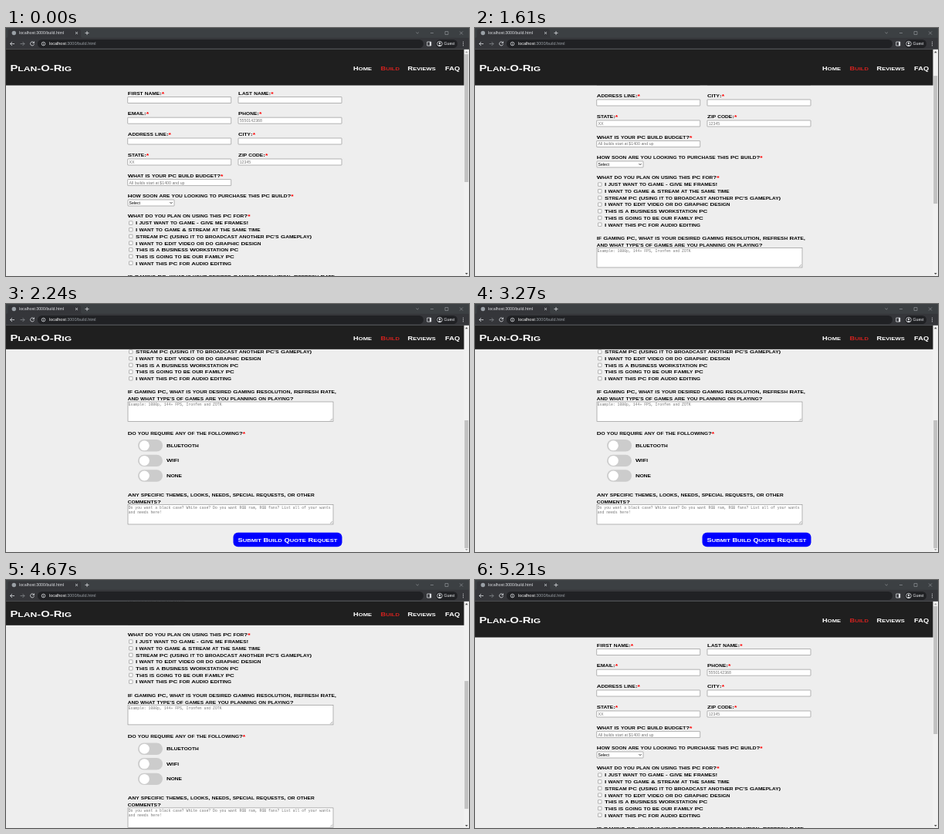
An HTML page that plays this animation: 600 px wide and 322 px high, repeating every 6480 ms.

```html
<!DOCTYPE html>
<html lang="en">
<head>
<meta charset="utf-8">
<title>Quote form</title>
<style>
  html, body { margin: 0; height: 100%; overflow: hidden; background: #eee; }
  svg { display: block; width: 600px; height: 322px; font-family: "Liberation Sans", Arial, sans-serif; }
  .wide { font-weight: bold; }
  .low { font-size: .82em; text-transform: uppercase; }
  .star { fill: #f00; font-size: 1.1em; }
  .hint { font-size: 5.25px; fill: #757575; }
  .mono { font: 4.8px "Liberation Mono", monospace; fill: #757575; }
  .field { fill: #fff; stroke: #858585; stroke-width: .6; }
  .line { fill: none; stroke: #dadce0; stroke-width: .8; }
  .dim { stroke: #85888c; }
</style>
</head>
<body>
<svg viewBox="0 0 600 322">
  <rect width="600" height="322" fill="#eee"/>
  <g id="form"></g>
  <rect id="bar" y="27.500" width="594" height="47"  fill="#1f1f1f"/>
  <g id="nav"></g>
  <g id="scrollbar">
    <rect x="593.5" y="27.500" width="6.5" height="294.500" fill="#f1f1f1"/>
    <path id="up" d="M595 32.2h3.6l-1.8-2.2z" fill="#505050"/>
    <path id="down" d="M595 318h3.6l-1.8 2.2z" fill="#505050"/>
    <rect id="thumb" x="594.2" y="34" width="5" height="166" fill="#c1c1c1"/>
  </g>
  <g id="browser">
    <rect width="600" height="27.500" fill="#3c4043"/>
    <path d="M0 12.800q2.5 0 2.5-2.5V4Q2.5 1.500 5 1.500H94Q97 1.500 97 4V10.300Q97 12.800 99 12.800H600V27.500H0z" fill="#35363a"/>
    <circle cx="10.300" cy="6.500" r="2.700" fill="#9aa0a6"/>
    <text x="17" y="8.400" font-size="5.270" fill="#dfe1e5">localhost:3000/build.html</text>
    <path class="line" d="M90 5l3 3m0-3l-3 3M102.500 6.500h5m-2.500-2.500v5"/>
    <path class="line dim" d="M531.500 5.500l1.700 1.700 1.700-1.700M550 6.500h4M569 4.500h4v4h-4zM588 4.500l4 4m0-4l-4 4"/>
    <rect x="41" y="15" width="500" height="11" rx="5.500" fill="#202124"/>
    <path class="line" d="M11 20.500H5.500m2.500-2.500l-2.500 2.500 2.500 2.500M36 18.800a2.500 2.500 0 1 0 .5 2M36.500 17.500v2h-2"/>
    <path class="line dim" d="M18.500 20.500H24m-2.500-2.500l2.500 2.500-2.500 2.500"/>
    <circle class="line" cx="48.500" cy="20.500" r="2.300"/>
    <path class="line" d="M48.500 20.200v1.600M48.500 18.900v.6M545.800 18h5v5h-5z"/>
    <rect x="549" y="18" width="2" height="5" fill="#dadce0"/>
    <text x="56" y="22.400" font-size="5.500" fill="#9aa0a6"><tspan fill="#fff">localhost</tspan>:3000/build.html</text>
    <rect x="557" y="15" width="28" height="11" rx="5.500" fill="#202124"/>
    <circle class="line" cx="562" cy="20.500" r="3.300"/>
    <path d="M560 22.800q2-2.200 4 0l-2 .9z" fill="#dadce0"/>
    <circle cx="562" cy="19.700" r="1.200" fill="#dadce0"/>
    <text x="567.500" y="22.300" font-size="5.200" fill="#e8eaed">Guest</text>
    <path d="M592 17.800h1v1h-1zm0 2.200h1v1h-1zm0 2.200h1v1h-1z" fill="#dadce0"/>
  </g>
</svg>
<script>
const $ = id => document.getElementById(id);
const LOOP = 6480, MAX = 208.5, WIDEN = 1.4;

// Extended small-caps lettering, centred on y
const wide = (x, y, text, { size = 8, fill = '#000', star = false } = {}) =>
  `<text class="wide" transform="translate(${x} ${y + size * .26}) scale(${WIDEN} 1)" font-size="${size / WIDEN}" fill="${fill}">` +
  text.replace(/[a-z']+/g, w => `<tspan class="low">${w}</tspan>`) +
  (star ? '<tspan class="star" dy="1">*</tspan>' : '') + '</text>';

const label = (x, y, text) => wide(x, y, text, { star: true });
const plain = (x, y, text, kind) => `<text class="${kind}" x="${x}" y="${y}">${text}</text>`;
const box = (x, y, w, h, rx = .4) => `<rect class="field" x="${x}" y="${y}" width="${w}" height="${h}" rx="${rx}"/>`;

const input = (x, y, name, hint = '') =>
  label(x, y, name) + box(x, y + 5, 134, 8) + plain(x + 1.7, y + 10.9, hint, 'hint');

const area = (y, ...lines) => box(158, y, 266, 25.5, 0) +
  lines.map((s, i) => plain(158.7, y + 5.3 + i * 5.7, s, 'mono')).join('') +
  `<path d="M420 ${y + 24.5}l3-3m-1.400 3l1.400-1.400" stroke="#777" stroke-width=".5"/>`;

const check = (text, i) => {
  const y = 253.4 + i * 8.68;
  return box(159.5, y - 2.5, 4.5, 4.5) + wide(168, y, text);
};

const toggle = (text, i) => {
  const y = 392.3 + i * 19.6;
  return `<rect x="171" y="${y - 7.7}" width="32" height="15.400" rx="7.700" fill="#ccc"/>` +
    `<circle cx="179.300" cy="${y}" r="6.500" fill="#fff"/>` + wide(208, y, text);
};

const L = 157.7, R = 301;
$('form').innerHTML = [
  input(L, 84.5, 'First name:'), input(R, 84.5, 'Last name:'),
  input(L, 111.2, 'Email:'), input(R, 111.2, 'Phone:', '5550142368'),
  input(L, 138, 'Address line:'), input(R, 138, 'City:'),
  input(L, 165, 'State:', 'XX'), input(R, 165, 'Zip code:', '12345'),
  input(L, 191.6, 'What is your PC build budget?', 'All builds start at $1400 and up'),
  label(L, 218, 'How soon are you looking to purchase this PC build?'),
  box(158, 223, 60, 8), '<text x="159.500" y="228.900" font-size="5.200">Select</text>',
  '<path d="M212.500 226.200l1.500 1.500 1.500-1.500" fill="none" stroke="#000" stroke-width=".8"/>',
  label(L, 244.2, 'What do you plan on using this PC for?'),
  ...['I just want to Game - Give me Frames!', 'I want to Game & Stream at the same time',
    "Stream PC (Using it to broadcast another PC's Gameplay)", 'I want to Edit Video or do Graphic Design',
    'This is a Business Workstation PC', 'This is going to be our Family PC',
    'I want this PC for Audio Editing'].map(check),
  wide(L, 322.7, 'If Gaming PC, what is your desired Gaming Resolution, Refresh Rate,'),
  wide(L, 331.6, "and what type's of games are you planning on playing?"),
  area(335.5, 'Example: 1080p, 144+ FPS, Ironfen and ZOTK'),
  label(L, 376.5, 'Do you require any of the following?'),
  ...['Bluetooth', 'WiFi', 'None'].map(toggle),
  wide(L, 456.3, 'Any specific themes, looks, needs, special requests, or other'),
  wide(L, 465, 'comments?'),
  area(469, 'Do you want a black case? White case? Do you want RGB ram, RGB fans? List all of your wants', 'and needs here!'),
  '<rect x="294.500" y="505.300" width="141" height="18.400" rx="6" fill="#00f"/>',
  wide(300.5, 514.8, 'Submit Build Quote Request', { size: 9.3, fill: '#fff' })
].join('');

$('nav').innerHTML = wide(5.5, 52, 'Plan-O-Rig', { size: 14.8, fill: '#fff' }) +
  [[450, 'Home'], [485.5, 'Build'], [520.5, 'Reviews'], [569, 'FAQ']].map(([x, text]) =>
    wide(x, 52.2, text, { size: 9.3, fill: text === 'Build' ? '#d3221f' : '#fff' })).join('');

// Scroll stops: [time, offset]
const stops = [[0, 0], [1410, 0], [1420, 3.5], [1910, 141.5], [2060, MAX], [4500, MAX], [5153, 0], [LOOP, 0]];

function scrollAt(t) {
  const i = stops.findIndex(s => s[0] > t);
  const [t0, a] = stops[i - 1], [t1, b] = stops[i];
  const p = (t - t0) / (t1 - t0);
  return a + (b - a) * p * p * (3 - 2 * p);
}

function draw() {
  const y = scrollAt(performance.now() % LOOP);
  const small = y > 80;
  $('form').setAttribute('transform', `translate(0 ${-y})`);
  $('bar').setAttribute('height', small ? 31.3 : 47);
  $('nav').setAttribute('transform', `translate(0 ${small ? -7.7 : 0})`);
  $('thumb').setAttribute('y', 34 + y / MAX * 117);
  $('up').setAttribute('fill', y < 1 ? '#a3a3a3' : '#505050');
  $('down').setAttribute('fill', y > MAX - 1 ? '#a3a3a3' : '#505050');
  requestAnimationFrame(draw);
}
draw();
</script>
</body>
</html>
```
